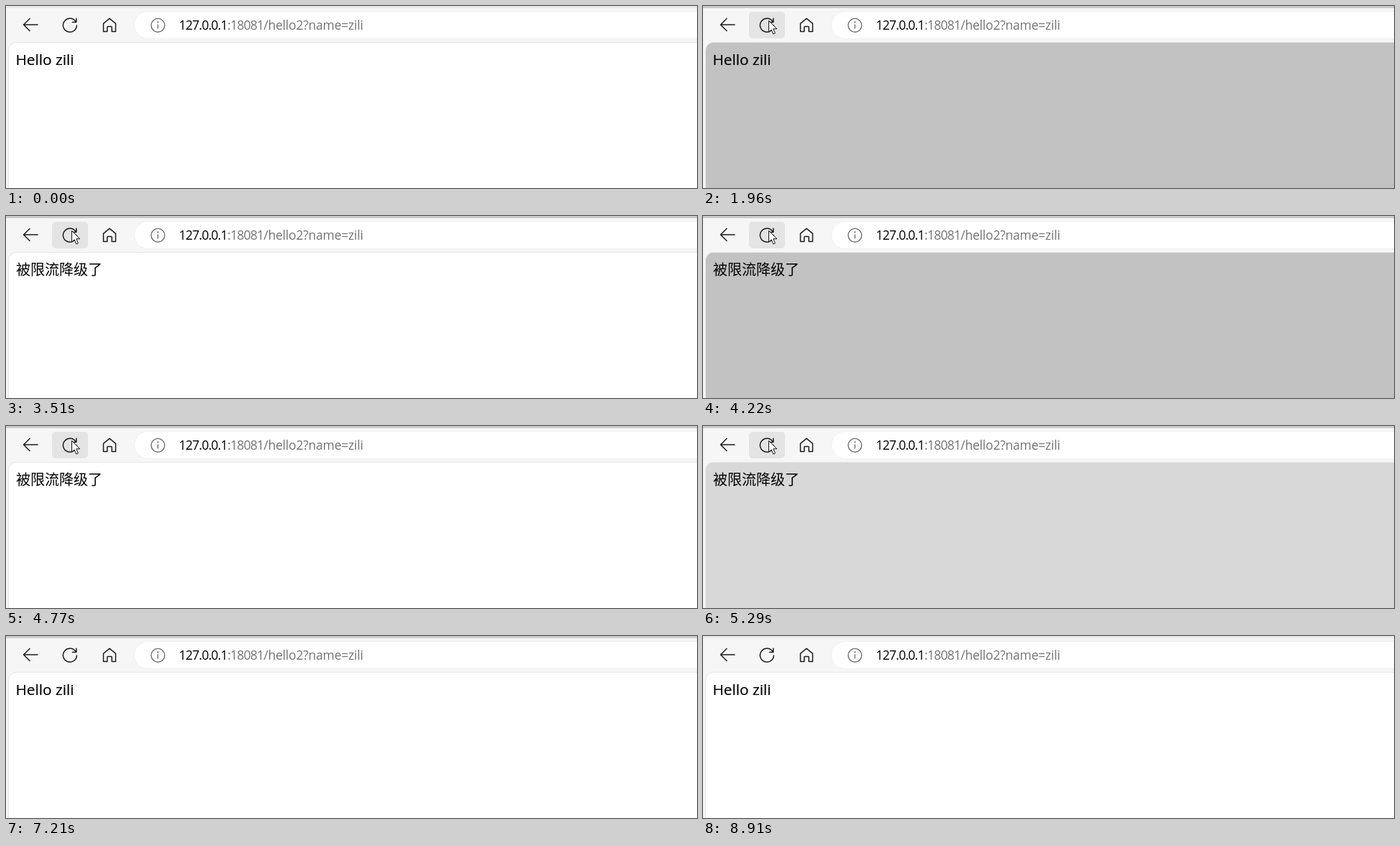
Write an HTML page that moves like this. It is 961x253 px and loops after 9010 ms.

```html
<!DOCTYPE html>
<html lang="zh">
<head>
<meta charset="utf-8">
<title>Reload demo</title>
<style>
  html, body { margin: 0; width: 100%; height: 100%; overflow: hidden; background: #f6f6f6; }
  svg { display: block; }
  text { white-space: pre; }
  .url { font: 17.5px "Open Sans", "Noto Sans", sans-serif; letter-spacing: -.75px; }
  .path { letter-spacing: -.2px; }
  .latin { font: 20.8px "Open Sans", "Noto Sans", sans-serif; stroke: #000; stroke-width: .2; }
  .cjk { font: 20px "Noto Sans CJK SC", "Noto Sans CJK", sans-serif; }
  .icon { fill: none; stroke: #1c1c1c; stroke-width: 1.5; stroke-linecap: round; stroke-linejoin: round; }
</style>
</head>
<body>
<svg width="961" height="253" viewBox="0 0 961 253">
  <rect width="961" height="253" fill="#f6f6f6"/>
  <rect id="strip" width="961" height="3"/>

  <rect id="hover" x="64" y="8" width="50" height="37" rx="5" fill="#e4e4e4"/>
  <g class="icon">
    <path d="M44 26H24.5M33 17.5L24.5 26L33 34.5"/>
    <path d="M97.3 22.3A9.5 9.5 0 1 0 98.4 27M97.8 17.2V22.6H92.4"/>
    <path d="M135.5 24.3L144 17.3L152.5 24.3V35.5H147.2V29.5Q147.2 28.5 146.2 28.5H141.8Q140.8 28.5 140.8 29.5V35.5H135.5Z"/>
  </g>

  <rect x="178.5" y="7.5" width="820" height="38" rx="19" fill="#fff" stroke="#f0f0f0"/>
  <g fill="none" stroke="#707070" stroke-width="1.4">
    <circle cx="211.3" cy="26.8" r="9.4"/>
    <path d="M211.3 25.4V31.6"/>
  </g>
  <circle cx="211.3" cy="22.4" r="1.1" fill="#707070"/>
  <text class="url" x="240.5" y="33" fill="#000">127.0.0.1</text>
  <text class="url" x="308" y="33" fill="#747474">:18081<tspan class="path">/hello2?name=zili</tspan></text>

  <rect id="page" x="3.5" y="50.5" width="990" height="240" rx="11" stroke="#e6e6e6"/>
  <text id="hello" class="latin" x="13.5" y="82" fill="#000">Hello zili</text>
  <text id="limited" class="cjk" x="14" y="82" fill="#000">被限流降级了</text>

  <path id="cursor" d="M.5 .5V16.2L4.1 12.8L6.8 19L9.4 17.9L6.8 11.8H11.8Z"
        fill="#fff" stroke="#111" stroke-width="1"/>
</svg>
<script>
  const LOOP = 9010;
  const FOCUS = 1830, LIMIT = 2490, DONE = 7210, BLUR = 8910;

  // Page reloads: each one flashes through a few grey levels
  const reloads = [1830, 2060, 2350, 2650, 2990, 3280, 3370, 3660, 4110, 4390,
    4590, 4940, 5290, 5530, 5800, 6080, 6280, 6470, 6770, 7070];
  const flash = [[60, '#d8d8d8'], [110, '#7b7b7b'], [140, '#c2c2c2']];

  // Pointer path: time, x, y
  const path = [[90, 307, 225], [620, 80, 16], [970, 167, 9], [1060, 167, 9], [1530, 91, 20]];

  const el = id => document.getElementById(id);
  const [strip, hover, page, hello, limited, cursor] =
    ['strip', 'hover', 'page', 'hello', 'limited', 'cursor'].map(el);
  const show = (node, on) => node.setAttribute('visibility', on ? 'visible' : 'hidden');
  const ease = p => p * p * (3 - 2 * p);

  function pointer(t) {
    const i = path.findIndex(p => p[0] > t);
    if (i < 0) return path[path.length - 1].slice(1);
    if (i === 0) return path[0].slice(1);
    const [t0, x0, y0] = path[i - 1], [t1, x1, y1] = path[i];
    const p = ease((t - t0) / (t1 - t0));
    return [x0 + (x1 - x0) * p, y0 + (y1 - y0) * p];
  }

  function pageColor(t) {
    const start = reloads.filter(s => s <= t).pop();
    const phase = flash.find(([end]) => t - start < end);
    return phase ? phase[1] : '#fff';
  }

  function render(t) {
    const [x, y] = pointer(t);
    const visible = t >= 90 && t < DONE;
    const limit = t >= LIMIT && t < DONE;
    strip.setAttribute('fill', t >= FOCUS && t < BLUR ? '#cbcbcb' : '#e9e9e9');
    page.setAttribute('fill', pageColor(t));
    cursor.setAttribute('transform', `translate(${x} ${y})`);
    show(cursor, visible);
    show(hover, visible && x >= 64 && x < 114 && y >= 8 && y < 45);
    show(hello, !limit);
    show(limited, limit);
  }

  const begin = performance.now();
  function tick() {
    render((performance.now() - begin) % LOOP);
    requestAnimationFrame(tick);
  }
  tick();
</script>
</body>
</html>
```
